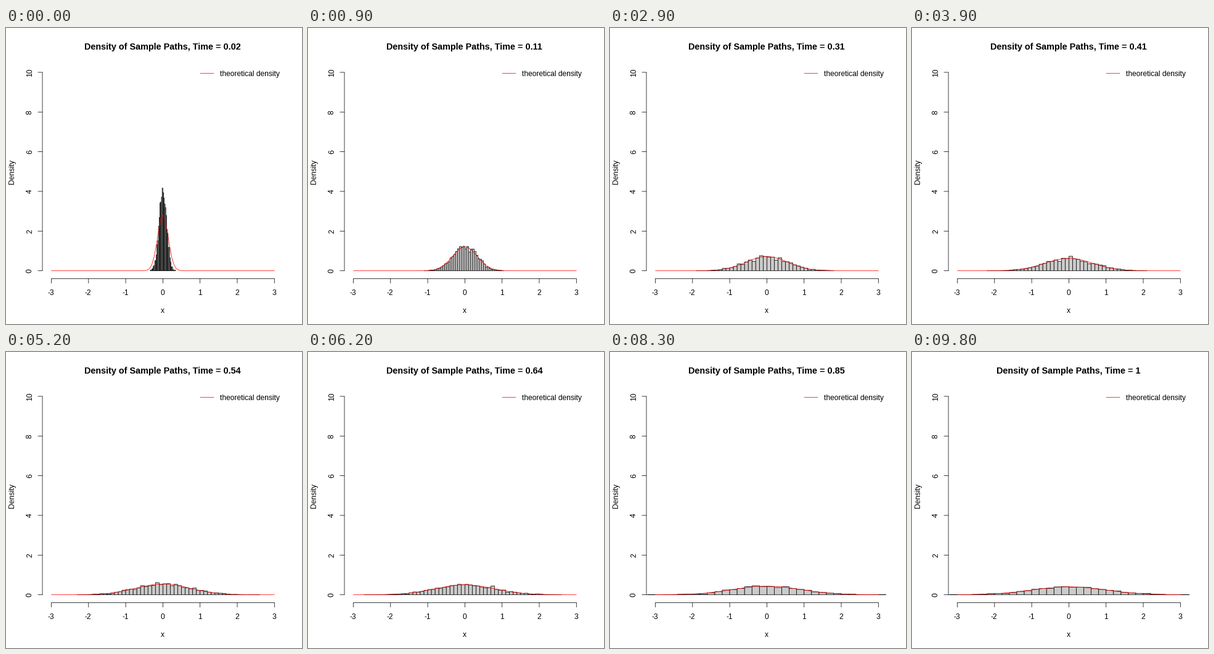
A matplotlib script that plays this animation: 480 by 480 pixels, repeating every 9.9 s.

```python
import numpy as np
import matplotlib.pyplot as plt
from matplotlib.animation import FuncAnimation
from matplotlib.collections import PolyCollection
from matplotlib.patches import Rectangle

SIZE, DPI = 480, 80
PX = 72 / DPI  # points per pixel
THIN = 0.75 * PX
FRAMES, INTERVAL = 99, 100
LEFT, RIGHT, TOP, BOTTOM = 59.04, 449.76, 59.04, 406.56
X_UNIT = (RIGHT - LEFT) / 6.48
Y_UNIT = (BOTTOM - TOP) / 10.8
X_MID = (LEFT + RIGHT) / 2
Y_ZERO = BOTTOM - 0.4 * Y_UNIT

# Sample extremes, in standard deviations, along the run
KEYS = [0, 19, 39, 52, 72, 83, 98]
LOW = [3.3, 3.47, 3.4, 3.09, 3.65, 3.71, 3.6]
HIGH = [3.3, 3.24, 3.24, 3.5, 2.83, 3.44, 3.47]

rng = np.random.default_rng(4)
paths = np.cumsum(rng.normal(0, 0.1, (FRAMES, 3000)), axis=0)


def to_x(x):
    return X_MID + X_UNIT * np.asarray(x)


def to_y(y):
    return Y_ZERO - Y_UNIT * np.asarray(y)


def bin_width(span, cells=40):
    """Round the cell size to 1, 2, 5 or 10 times a power of ten."""
    cell = span / cells
    base = 10 ** np.floor(np.log10(cell))
    for limit, unit in ((1.4, 1), (3.2, 2), (19 / 3, 5)):
        if cell / base <= limit:
            return unit * base
    return 10 * base


def histogram(i):
    sd = np.sqrt((i + 1) / 100)
    low = -sd * np.interp(i, KEYS, LOW)
    high = sd * np.interp(i, KEYS, HIGH)
    data = paths[i]
    data = np.append(data[(data > low) & (data < high)], [low, high])
    width = bin_width(high - low)
    edges = np.arange(np.floor(low / width), np.ceil(high / width) + 1) * width
    return edges, np.histogram(data, edges, density=True)[0]


fig = plt.figure(figsize=(SIZE / DPI, SIZE / DPI), dpi=DPI, facecolor="white")
ax = fig.add_axes([0, 0, 1, 1])
ax.set_xlim(0, SIZE)
ax.set_ylim(SIZE, 0)
ax.axis("off")


def line(xs, ys, color="black", z=2):
    return ax.plot(xs, ys, color=color, lw=THIN, zorder=z, snap=False,
                   solid_capstyle="round")[0]


def label(x, y, text, size=12, **kw):
    kw = {"ha": "center", **kw}
    return ax.text(x, y, text, fontsize=size * PX, family="Liberation Sans",
                   va="baseline", rotation_mode="anchor", **kw)


# Axes
line(to_x([-3, 3]), [BOTTOM] * 2)
line([LEFT] * 2, to_y([0, 10]))
for v in range(-3, 4):
    line([to_x(v)] * 2, [BOTTOM, BOTTOM + 7.2])
    label(to_x(v) - 0.5, 433, str(v))
for v in range(0, 11, 2):
    line([LEFT - 7.2, LEFT], [to_y(v)] * 2)
    label(42, to_y(v), str(v), rotation=90)
label(X_MID - 0.5, 462, "x")
label(13, (TOP + BOTTOM) / 2, "Density", rotation=90)

# Legend
line([315, 337], [73.44] * 2, color="red")
label(347.3, 78, "theoretical density", ha="left")

title = label(X_MID - 0.5, 35, "", size=14.4, weight="bold")
bars = PolyCollection([], facecolors="#cbcbcb", edgecolors="black",
                      linewidths=THIN, zorder=3)
bars.set_snap(False)
ax.add_collection(bars, autolim=False)
bars.set_clip_path(Rectangle((LEFT, TOP), RIGHT - LEFT, BOTTOM - TOP,
                             transform=ax.transData))

grid = np.linspace(-3, 3, 101)
curve = line(to_x(grid), to_y(0 * grid), color="red", z=4)


def update(i):
    t = (i + 2) / 100
    title.set_text(f"Density of Sample Paths, Time = {t:g}")
    edges, heights = histogram(i)
    xs, tops = to_x(edges), to_y(heights)
    bars.set_verts([[(a, Y_ZERO), (a, top), (b, top), (b, Y_ZERO)]
                    for a, b, top in zip(xs, xs[1:], tops)])
    curve.set_ydata(to_y(np.exp(-grid**2 / (2 * t)) / np.sqrt(2 * np.pi * t)))
    return title, bars, curve


anim = FuncAnimation(fig, update, frames=FRAMES, interval=INTERVAL,
                     repeat=True, repeat_delay=0, blit=False)
plt.show()
```
